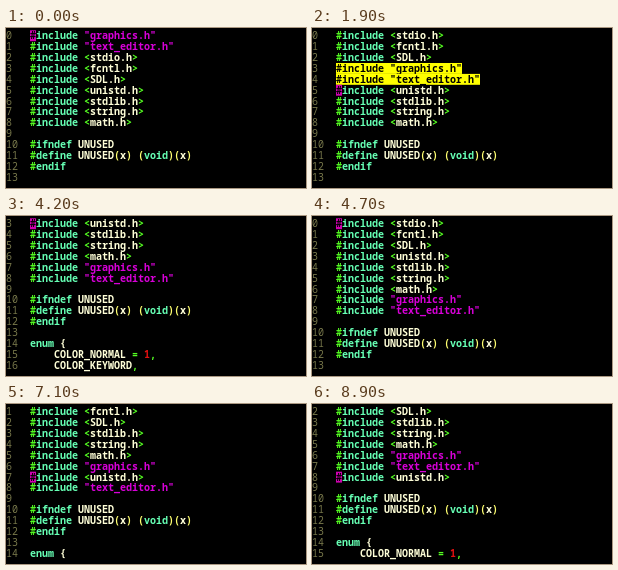
An HTML page with a canvas for the animation above (9 s loop, 300 by 160 pixels).

```html
<!DOCTYPE html>
<html>
<head>
<meta charset="utf-8">
<style>
  html, body { margin: 0; width: 100%; height: 100%; overflow: hidden; background: #000; }
  canvas { display: block; }
</style>
</head>
<body>
<canvas width="300" height="160"></canvas>
<script>
const ctx = document.querySelector('canvas').getContext('2d');
const LOOP = 9000, ROWS = 14, SCROLL_MARGIN = 6;
const CHAR_W = 6, LINE_H = 10.9, LEFT = 24, TOP = 2.3, BASELINE = 8.8;
const NUMBER = '#77774a', TEXT = '#ffffd8', SELECTION = '#ffff00', CURSOR = '#d000b0';
const SYNTAX = {
  keyword: '#66ffb4',
  string: '#d800d8',
  literal: '#e01010',
  operator: '#55ff22',
  paren: '#ffff70'
};

const headers = ['"graphics.h"', '"text_editor.h"', '<stdio.h>', '<fcntl.h>', '<SDL.h>',
  '<unistd.h>', '<stdlib.h>', '<string.h>', '<math.h>'];
const source = [
  ...headers.map(name => '#include ' + name),
  '',
  '#ifndef UNUSED',
  '#define UNUSED(x) (void)(x)',
  '#endif',
  '',
  'enum {',
  '    COLOR_NORMAL = 1,',
  '    COLOR_KEYWORD,'
];

// Key presses: [start, interval, count, action]
const script = [
  [500, 300, 2, 'extend'],
  [1400, 230, 7, 'moveDown'],
  [3100, 0, 1, 'deselect'],
  [3400, 150, 9, 'up'],
  [4800, 180, 3, 'down'],
  [5500, 0, 1, 'moveDown'],
  [6000, 400, 3, 'moveDown'],
  [7300, 0, 1, 'moveDown']
];

const actions = {
  up(ed) { ed.cursor--; },
  down(ed) { ed.cursor++; },
  extend(ed) {
    ed.selected++;
    ed.cursor++;
  },
  deselect(ed) { ed.selected = 0; },
  // Carries the selected block, or the current line, past the next line.
  moveDown(ed) {
    const first = ed.cursor - ed.selected;
    const size = ed.selected || 1;
    const [next] = ed.lines.splice(first + size, 1);
    ed.lines.splice(first, 0, next);
    ed.cursor++;
  }
};

function editorAt(time) {
  const ed = { lines: [...source], cursor: 0, selected: 0, scroll: 0 };
  for (const [start, interval, count, action] of script) {
    for (let i = 0; i < count && start + i * interval <= time; i++) {
      actions[action](ed);
      ed.scroll = Math.min(ed.cursor, Math.max(ed.scroll, ed.cursor - SCROLL_MARGIN));
    }
  }
  return ed;
}

function box(x, y, chars, color) {
  ctx.fillStyle = color;
  ctx.fillRect(x, y, chars * CHAR_W, LINE_H);
}

function print(text, x, y, color) {
  ctx.fillStyle = color;
  [...text].forEach((char, i) => ctx.fillText(char, x + i * CHAR_W, Math.round(y + BASELINE)));
}

function printCode(line, y) {
  const tokens = /(?<keyword>(?<=#)\w+|enum|void)|(?<string>"[^"]*")|(?<literal>\d+)|(?<operator>[#<>=,])|(?<paren>[()])|[\w.]+|\S/g;
  for (const { 0: text, groups, index } of line.matchAll(tokens)) {
    const kind = Object.keys(groups).find(name => groups[name]);
    print(text, LEFT + index * CHAR_W, y, SYNTAX[kind] || TEXT);
  }
}

function draw() {
  const ed = editorAt(performance.now() % LOOP);
  ctx.fillStyle = '#000';
  ctx.fillRect(0, 0, 300, 160);
  for (let row = 0; row < ROWS; row++) {
    const n = ed.scroll + row;
    const line = ed.lines[n];
    const y = TOP + row * LINE_H;
    ctx.font = '10px "Noto Sans Mono", monospace';
    print(String(n), 0, y, NUMBER);
    ctx.font = '600 10px "Noto Sans Mono", monospace';
    if (n < ed.cursor && n >= ed.cursor - ed.selected) {
      box(LEFT, y, line.length, SELECTION);
      print(line, LEFT, y, '#000');
    } else {
      printCode(line, y);
    }
    if (n === ed.cursor) {
      box(LEFT, y, 1, CURSOR);
      print(line.slice(0, 1), LEFT, y, '#000');
    }
  }
  requestAnimationFrame(draw);
}
draw();
</script>
</body>
</html>
```
